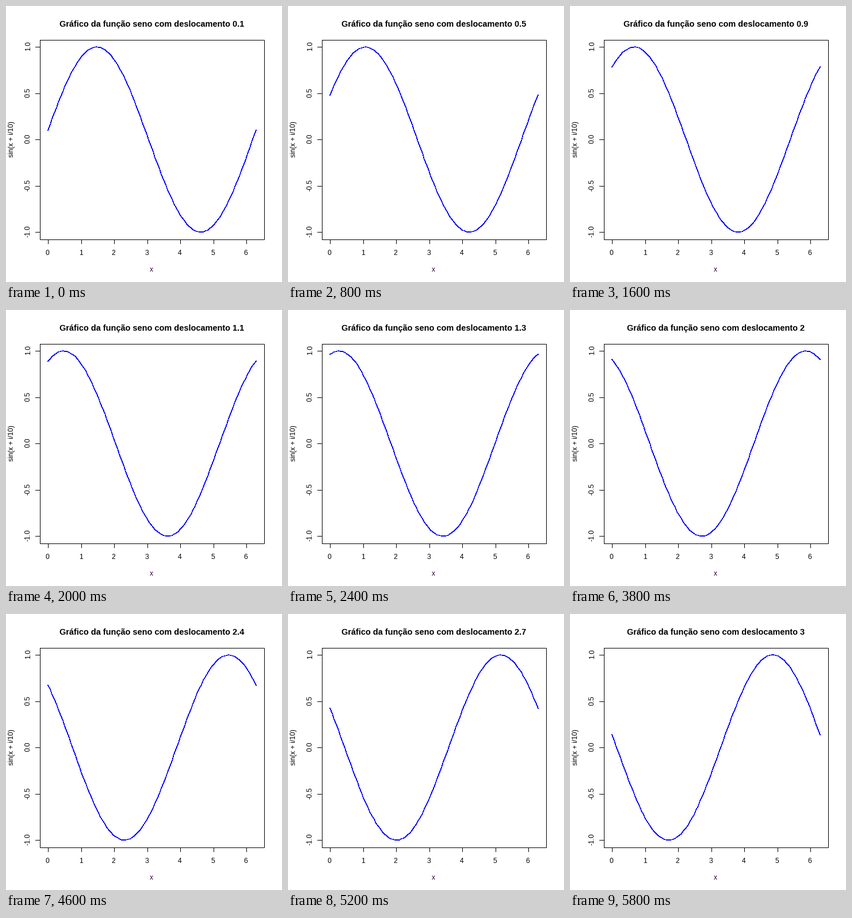
These frames come from a looping animation (480 px wide and 480 px high, 6000 ms). A matplotlib script:

```python
import numpy as np
import matplotlib.pyplot as plt
from matplotlib.animation import FuncAnimation

SIZE, DPI = 480, 100
PT = 72 / DPI  # points per pixel
FRAMES, STEP_MS = 30, 200

# Plot region in pixels, y pointing down
LEFT, TOP, RIGHT, BOTTOM = 59.04, 59.04, 449.76, 406.56
PAD = 0.04
TICK = 7.2

plt.rcParams["font.family"] = "Liberation Sans"


def to_px(u, start, end):
    """Map u in 0..1 onto whole pixels of a padded axis."""
    frac = (np.asarray(u) + PAD) / (1 + 2 * PAD)
    return np.floor(start + frac * (end - start))


def px_x(x):
    return to_px(np.asarray(x) / (2 * np.pi), LEFT, RIGHT)


def px_y(y):
    return to_px((1 - np.asarray(y)) / 2, TOP, BOTTOM)


fig = plt.figure(figsize=(SIZE / DPI, SIZE / DPI), dpi=DPI, facecolor="white")
ax = fig.add_axes([0, 0, 1, 1])
ax.set_xlim(0, SIZE)
ax.set_ylim(SIZE, 0)
ax.axis("off")


def rule(xs, ys):
    """One-pixel black line through pixel centres."""
    ax.plot(np.floor(xs) + 0.5, np.floor(ys) + 0.5, color="black", lw=PT,
            solid_capstyle="projecting", solid_joinstyle="miter", snap=False)


def label(x, y, text, px=12, **style):
    return ax.text(x, y, text, fontsize=px * PT, ha="center",
                   va="baseline", rotation_mode="anchor", **style)


rule([LEFT, RIGHT, RIGHT, LEFT, LEFT], [TOP, TOP, BOTTOM, BOTTOM, TOP])

for v in range(7):
    x = px_x(v)
    rule([x, x], [BOTTOM, BOTTOM + TICK])
    label(x - 1, 433, str(v))

for v in np.arange(-1, 1.5, 0.5):
    y = px_y(v)
    rule([LEFT - TICK, LEFT], [y, y])
    label(42, y - 1, f"{v:.1f}", rotation=90)

label(253, 462, "x", color="#2a0030")
label(13, 231.5, "sin(x + i/10)", rotation=90)
title = label(253.5, 36, "", px=14.5, weight="bold")

# Without antialiasing every touched pixel is filled, so a hairline
# on pixel corners comes out two pixels wide.
xs = np.linspace(0, 2 * np.pi, 100)
curve, = ax.plot([], [], color="blue", lw=0.45 * PT, antialiased=False,
                 solid_capstyle="round", solid_joinstyle="round", snap=False)


def draw(k):
    shift = (k + 1) / 10
    curve.set_data(px_x(xs), px_y(np.sin(xs + shift)))
    title.set_text(f"Gráfico da função seno com deslocamento {shift:g}")
    return curve, title


anim = FuncAnimation(fig, draw, frames=FRAMES, interval=STEP_MS,
                     init_func=lambda: draw(0), repeat=True, repeat_delay=0)
plt.show()
```
